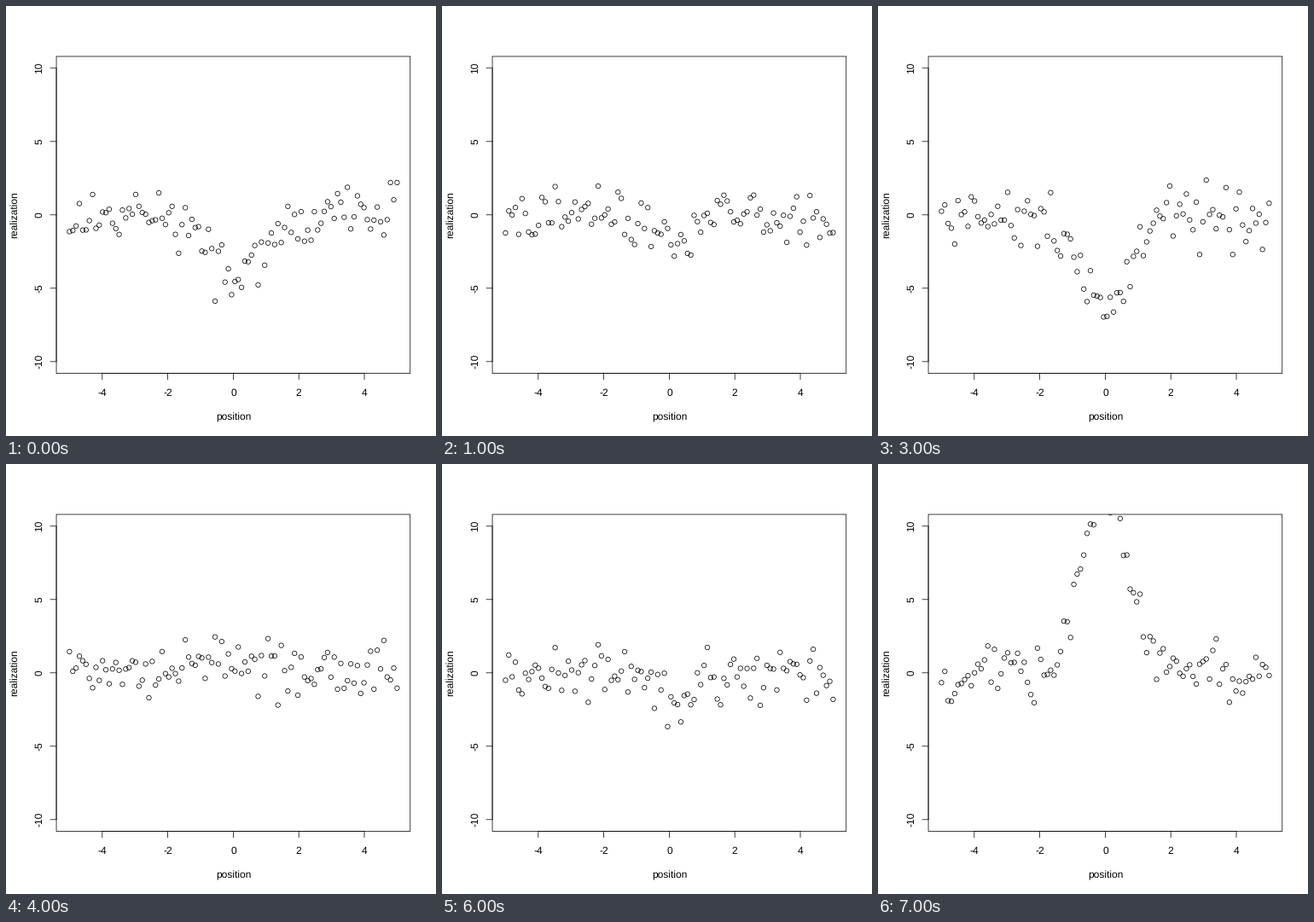
These frames come from a looping animation (504x504 px, 8000 ms). A matplotlib script:

```python
import numpy as np
import matplotlib.pyplot as plt
from matplotlib.animation import FuncAnimation
from matplotlib.patches import Rectangle

SIZE, DPI = 504, 72
LEFT, RIGHT, TOP, BOTTOM = 59.04, 473.76, 59.04, 430.56
CX, CY = (LEFT + RIGHT) / 2, (TOP + BOTTOM) / 2
X_UNIT, Y_UNIT = 38.4, 17.2
TICK = 7.2
STROKE = 0.75

# Height of the bell curve in each realization; unit noise is added to it.
PEAKS = [-4.6, -1.5, -11.0, -6.4, 1.0, -9.3, -1.6, 12.3]
SEED = 40

plt.rcParams["font.family"] = "Liberation Sans"
plt.rcParams["font.size"] = 12
plt.rcParams["text.hinting"] = "none"

fig = plt.figure(figsize=(SIZE / DPI, SIZE / DPI), dpi=DPI, facecolor="white")
ax = fig.add_axes([0, 0, 1, 1])
ax.set_xlim(0, SIZE)
ax.set_ylim(SIZE, 0)
ax.axis("off")


def to_x(v):
    return CX + v * X_UNIT


def to_y(v):
    return CY - v * Y_UNIT


def line(xs, ys):
    ax.plot(xs, ys, color="black", lw=STROKE, snap=False,
            solid_capstyle="round")


def label(x, y, text, angle=0):
    ax.text(x, y, text, ha="center", va="baseline",
            rotation=angle, rotation_mode="anchor")


def draw_axes():
    ax.add_patch(Rectangle((LEFT, TOP), RIGHT - LEFT, BOTTOM - TOP, fill=False,
                           ec="black", lw=STROKE, snap=False))
    # Each axis has its own line between its end ticks, over the box.
    line([to_x(-4), to_x(4)], [BOTTOM, BOTTOM])
    line([LEFT, LEFT], [to_y(-10), to_y(10)])
    for v in range(-4, 5, 2):
        line([to_x(v)] * 2, [BOTTOM, BOTTOM + TICK])
        label(to_x(v), 457, str(v))
    for v in range(-10, 11, 5):
        line([LEFT - TICK, LEFT], [to_y(v)] * 2)
        label(42, to_y(v), str(v), 90)
    label(CX, 486, "position")
    label(13, CY, "realization", 90)


draw_axes()

position = np.linspace(-5, 5, 100)
bell = np.exp(-position ** 2)

# Circles 5.4 px across, cut off at the plot box.
dots = ax.scatter(to_x(position), np.full(100, CY), s=5.4 ** 2,
                  facecolors="none", edgecolors="black", linewidths=STROKE)
dots.set_clip_path(Rectangle((LEFT, TOP), RIGHT - LEFT, BOTTOM - TOP,
                             transform=ax.transData))


def update(i):
    noise = np.random.default_rng(SEED + i).normal(size=100)
    value = PEAKS[i] * bell + np.clip(noise, -2.7, 2.4)
    dots.set_offsets(np.column_stack([to_x(position), to_y(value)]))
    return [dots]


anim = FuncAnimation(fig, update, frames=len(PEAKS), interval=1000,
                     repeat=True, repeat_delay=0)
plt.show()
```
